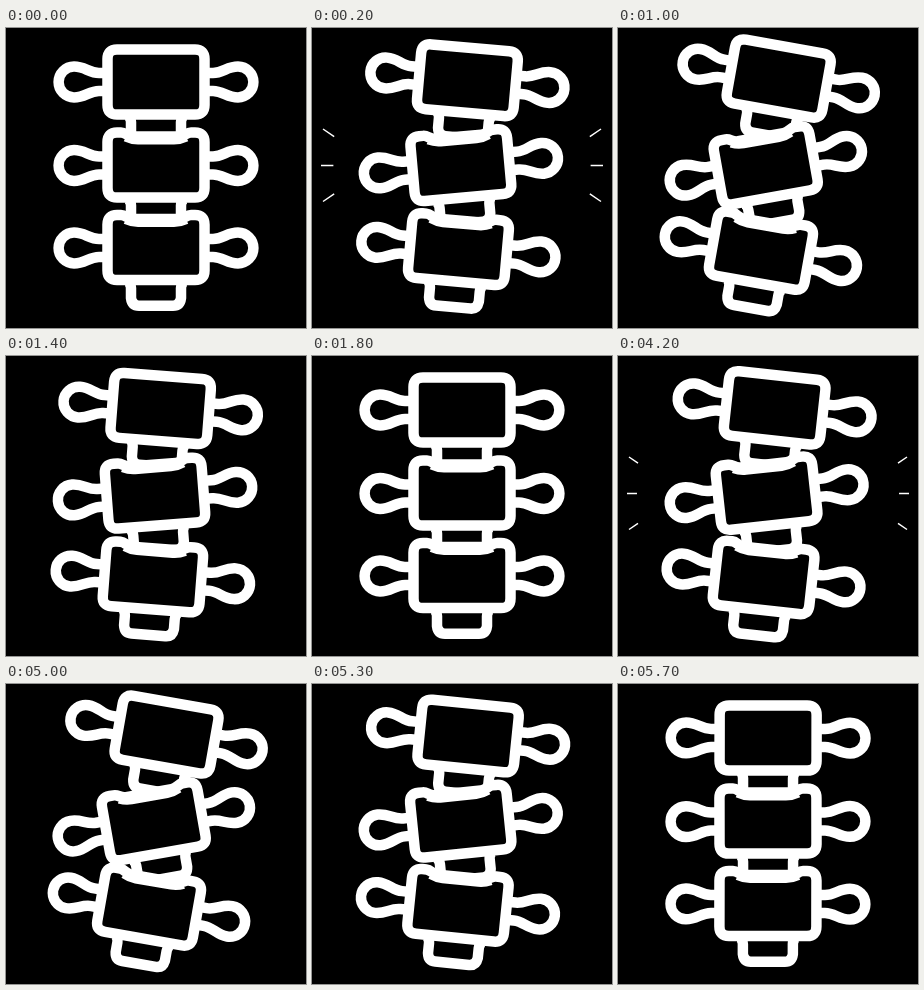
These frames come from a looping animation (300 px wide and 300 px high, 8100 ms). An HTML page:

```html
<!DOCTYPE html>
<html lang="en">
<head>
<meta charset="utf-8">
<title>Spine</title>
<style>
  html, body { margin: 0; width: 100%; height: 100%; overflow: hidden; background: #000; }
  svg { display: block; width: 100vw; height: 100vh; }
</style>
</head>
<body>
<svg viewBox="0 0 300 300">
  <defs>
    <path id="handle" d="M-49 -9H-57C-67 -9 -71 -15.4 -82 -15.4A15.4 15.4 0 0 0 -82 15.4C-71 15.4 -67 9 -57 9H-49"/>
    <path id="disc" d="M-30 33Q-25 34 -25 40V50Q-24 57.7 -17 57.7H17Q24 57.7 25 50V40Q25 34 30 33"/>
    <path id="flat" d="M-39 -32.5H39Q48.5 -32.5 48.5 -23V23Q48.5 32.5 39 32.5H-39Q-48.5 32.5 -48.5 23V-23Q-48.5 -32.5 -39 -32.5Z"/>
    <path id="saddle" d="M-39 -33H-35C-30 -33 -29 -29 -23 -29H23C29 -29 30 -33 35 -33H39Q48.5 -33 48.5 -23.5V22.5Q48.5 32 39 32H-39Q-48.5 32 -48.5 22.5V-23.5Q-48.5 -33 -39 -33Z
      M-30 -29Q-24 -26.2 -18 -26.2H18Q24 -26.2 30 -29"/>
  </defs>
  <g id="spine" fill="#000" stroke="#fff" stroke-width="10.5" stroke-linejoin="round"></g>
  <g id="rays" stroke="#fff" stroke-width="1.5"></g>
</svg>
<script>
const LOOP = 8100, STEP = 100, SECOND = 3970;
const spine = document.getElementById('spine');
const rays = document.getElementById('rays');

// Rest position, and the shift and turn of the strained pose
const bones = [
  { y: 54, dx: 10.8, dy: -3.5, turn: 10.2, body: 'flat' },
  { y: 137.5, dx: -2.2, dy: 0.3, turn: -10.2, body: 'saddle' },
  { y: 220, dx: -7.2, dy: 3.2, turn: 10.2, body: 'saddle' }
];
// Inner and outer ends of the left-hand rays
const lines = [[25, 110.5, 11, 101], [24.5, 137.5, 9, 137.5], [25, 164, 11, 173.5]];

const clamp = v => Math.min(1, Math.max(0, v));
const smooth = v => (1 - Math.cos(Math.PI * clamp(v))) / 2;
const easeOut = v => 1 - (1 - clamp(v)) ** 2;
const mix = (a, b, k) => a + (b - a) * k;

for (const bone of bones) {
  spine.insertAdjacentHTML('beforeend', `<g><use href="#disc"/><use href="#handle"/>
    <use href="#handle" transform="scale(-1 1)"/><use href="#${bone.body}"/></g>`);
  bone.el = spine.lastElementChild;
}

function draw(t) {
  const s = t < SECOND ? t : t - SECOND;
  const strain = smooth(s / 400) * (1 - smooth((s - 950) / 830));
  for (const { el, y, dx, dy, turn } of bones) {
    el.setAttribute('transform',
      `translate(${150 + dx * strain} ${y + dy * strain}) rotate(${turn * strain})`);
  }

  const head = easeOut(s / 200), tail = smooth((s - 120) / 270);
  let d = '';
  if (head > tail) {
    for (const [x1, y1, x2, y2] of lines) {
      const xa = mix(x1, x2, tail), ya = mix(y1, y2, tail);
      const xb = mix(x1, x2, head), yb = mix(y1, y2, head);
      d += `M${xa} ${ya}L${xb} ${yb}M${300 - xa} ${ya}L${300 - xb} ${yb}`;
    }
  }
  rays.innerHTML = `<path d="${d}"/>`;
}

const start = performance.now();
function frame() {
  const t = (performance.now() - start) % LOOP;
  draw(Math.floor(t / STEP) * STEP);
  requestAnimationFrame(frame);
}
frame();
</script>
</body>
</html>
```
